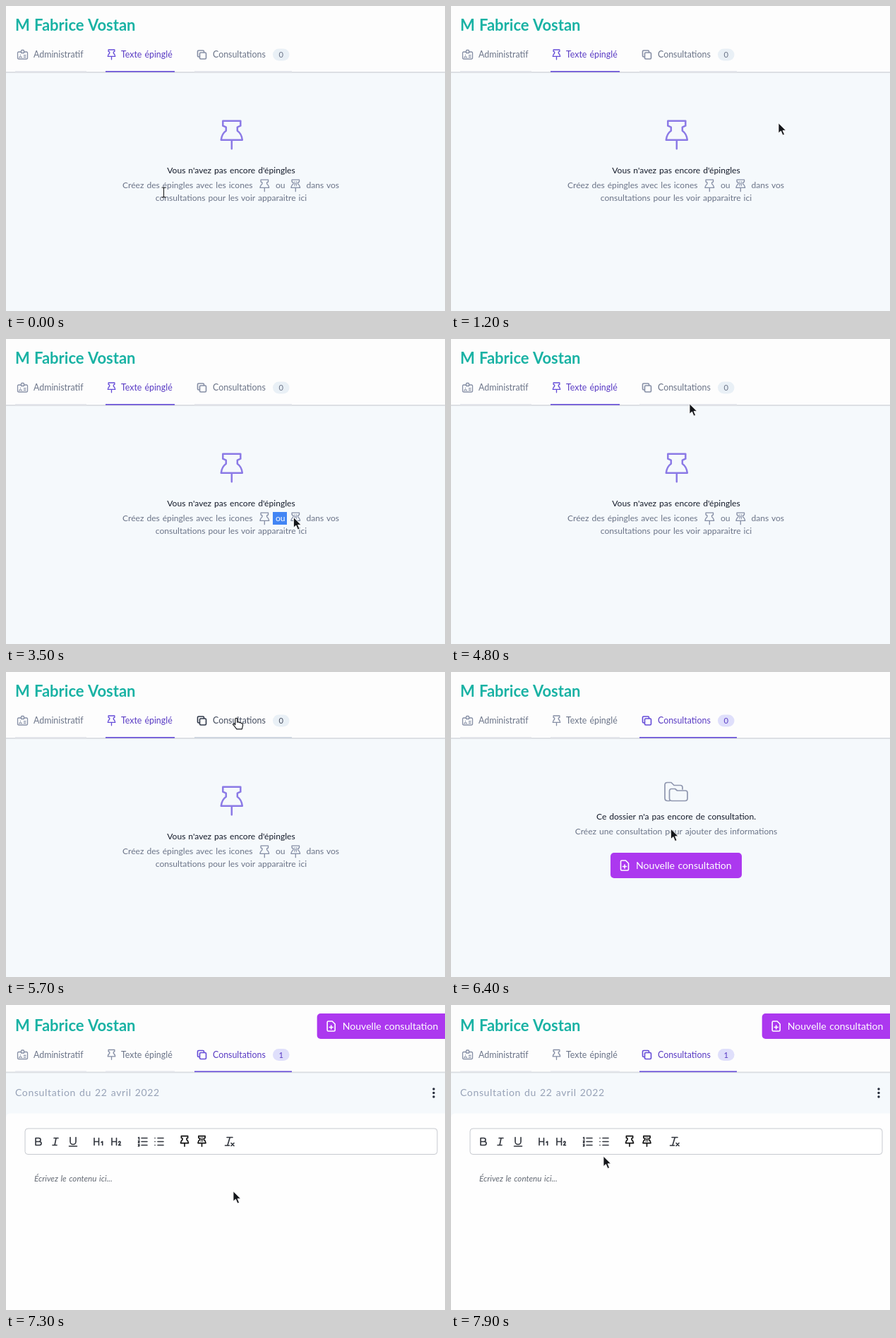
An HTML page for the animation above (8000 ms loop, 622 by 432 pixels).

```html
<!DOCTYPE html>
<html lang="fr">
<head>
<meta charset="utf-8">
<title>Consultations</title>
<style>
  html, body { margin: 0; width: 100%; height: 100%; overflow: hidden; background: #f5f9fc; }
  svg { display: block; width: 622px; height: 432px; font: 12.1px Lato, sans-serif; word-spacing: .07em; }
  path { fill: none; stroke: currentColor; stroke-width: 1.3; stroke-linejoin: round; stroke-linecap: round; vector-effect: non-scaling-stroke; }
  text { fill: currentColor; white-space: pre; }
  .mid { text-anchor: middle; }
  .dark { color: #151c2b; }
  .soft { color: #6b7488; }
  .tab { color: #6b7488; font-size: 12.4px; --line: #e4e6ec; --pill: #e9f0f6; }
  .tab .icon { color: #858ea5; }
  .tab.hover { color: #454d5f; --line: #cbd4df; }
  .tab.hover .icon { color: #2f3849; }
  .tab.active { color: #5a3cc4; --line: #644bd8; --pill: #dfdffb; }
  .tab.active .icon { color: #644bd8; }
  .line { fill: var(--line); }
  .pill { fill: var(--pill); }
  .button { color: #fff; font-size: 14.1px; }
  .tools path { stroke-width: 1.6; }
</style>
</head>
<body>
<svg id="stage" viewBox="0 0 622 432"></svg>
<script>
const PIN = 'M-12.5-20H12.5V-13L8-11V-6Q14-2 15 7H-15Q-14-2-8-6V-11L-12.5-13ZM0 7V19.5';
const HASH = 'M-3-14V1M3-14V1M-3-6H3';
const CARD = 'M-2-4H-5.500Q-7-4-7-2.500V4.500Q-7 6-5.500 6H5.500Q7 6 7 4.500V-2.500Q7-4 5.500-4H2M-2-2.500V-5.500Q-2-6.500-1-6.500H1Q2-6.500 2-5.500V-2.500ZM-4.800 3.800Q-3 2-1.200 3.800M-3 .500V.700M1.800 .800H4.500M1.800 3.300H4.500';
const COPY = 'M-1.500-3H4.500Q6-3 6-1.500V4.500Q6 6 4.500 6H-1.500Q-3 6-3 4.500V-1.500Q-3-3-1.500-3ZM-3 3H-4.500Q-6 3-6 1.500V-4.500Q-6-6-4.500-6H1.500Q3-6 3-4.500V-3';
const FOLDER = 'M-9.500 12.500H-12Q-16 12.500-16 8.500V-10Q-16-13.500-12.500-13.500H-7L-3-9.500H6Q9-9.500 9-6.500V-4M-9.500 9V-1.500Q-9.500-4.500-6.500-4.500H-1.500L1.500-2H13Q16-2 16 1V9Q16 12.500 12.500 12.500H-6Q-9.500 12.500-9.500 9Z';
const FILE = 'M-5.500-5.500Q-5.500-7-4-7H1.500L5.500-3V5.500Q5.500 7 4 7H-4Q-5.500 7-5.500 5.500ZM-2.500 1.500H2.500M0-1V4';

// Text-editor glyphs on an 18 px grid
const BULLETS = 'M7 4H15M7 9H15M7 14H15';
const TOOLS = [
  [46, 'M5 4H9.5a2.500 2.500 0 0 1 0 5H5ZM5 9H10.500a2.500 2.500 0 0 1 0 5H5Z'],
  [70, 'M7 4H13M5 14H11M8 14L10 4'],
  [95, 'M5 3V9a4 4 0 0 0 8 0V3M3.500 15.500H14.500'],
  [131, 'M3 4V14M9.500 4V14M3 9H9.500M13 10L14.700 8.800V14'],
  [156, 'M3 4V14M9.500 4V14M3 9H9.500M12.500 10Q12.800 8.700 14 8.800T15 10.200Q15 11.500 12.500 14H15.500'],
  [194, BULLETS + 'M2.500 3.500L3.500 3V6M2.500 8H4L2.500 10.500H4M2.500 13H4L3 14.200 4 15 2.500 15.500'],
  [217, BULLETS + 'M3 4H3.100M3 9H3.100M3 14H3.100'],
  [317, 'M5 3H13M6 14L9.300 3M11 11L15 15M15 11L11 15M2.500 14.500H8.500'],
];

const path = (d, x, y, scale = 1, width = '') =>
  `<path d="${d}" transform="translate(${x} ${y}) scale(${scale})" ${width && `style="stroke-width:${width}"`}/>`;
const hashPin = (x, y, scale) => path(PIN, x, y, scale) + path(HASH, x, y, scale, .9);
const text = (s, x, y, cls = '') => `<text x="${x}" y="${y}" class="${cls}">${s}</text>`;
const box = (x, y, w, h, fill, r = 0, more = '') =>
  `<rect x="${x}" y="${y}" width="${w}" height="${h}" rx="${r}" fill="${fill}" ${more}/>`;
const tab = (id, x, w, icon, label, labelX) =>
  `<g id="${id}" class="tab"><rect class="line" x="${x}" y="92" width="${w}" height="1.6"/>
   <g class="icon">${icon}</g>${text(label, labelX, 73)}`;
const button = id => `<g id="${id}" class="button">${box(226, 256, 186, 36, '#ac38ef', 5)}
  ${path(FILE, 246, 274, 1, 1.6)}${text('Nouvelle consultation', 262, 279)}</g>`;

stage.innerHTML = `
<g id="header">
  ${box(0, -5, 622, 98.500, '#fdfdfd')}${box(0, 93, 622, 1.800, '#dadde2')}
  <g font-size="22" font-weight="700" color="#19b2a4">${text('M Fabrice Vostan', 13, 35)}</g>
  ${tab('admin', 13, 101, path(CARD, 23.500, 69), 'Administratif', 39)}</g>
  ${tab('pinned', 141, 98, path(PIN, 149.500, 69, .35), 'Texte épinglé', 163)}</g>
  ${tab('consults', 267, 138, path(COPY, 277.500, 69, 1, 1.6), 'Consultations', 293)}
    <rect class="pill" x="378" y="60.500" width="23.500" height="17" rx="8.500"/>
    <text id="count" class="mid" x="389.700" y="73" font-size="11.2"></text>
  </g>
</g>
<g id="pinPane">
  <g color="#8b7ae6">${path(PIN, 319.800, 182.700, 1, 2.500)}</g>
  ${text("Vous n'avez pas encore d'épingles", 319, 237, 'mid dark')}
  <g class="soft">
    ${text('Créez des épingles avec les icones', 165, 258)}
    ${text('dans vos', 425.500, 258)}
    ${text('consultations pour les voir apparaitre ici', 319, 276, 'mid')}
    <rect id="selection" x="378" y="245" height="18" fill="#4285f4"/>
    <text id="or" x="382" y="258">ou</text>
    <g color="#858ea5">
      ${path(PIN, 366.300, 254.500, .42)}${hashPin(410.300, 254.500, .42)}
    </g>
  </g>
</g>
<g id="emptyPane">
  <g color="#8f97af">${path(FOLDER, 319, 170, 1, 1.700)}</g>
  ${text("Ce dossier n'a pas encore de consultation.", 319, 209, 'mid dark')}
  ${text('Créez une consultation pour ajouter des informations', 319, 230, 'mid soft')}
  <g id="ring">${box(224, 253.700, 190, 40.500, '#fff', 6, 'stroke="#83cbe5" stroke-width="2"')}</g>
  ${button('create')}
</g>
<g id="editPane">
  <g transform="translate(214.7 -244)">${button('createTop')}</g>
  <g font-size="14" letter-spacing=".65" color="#97a2b7">${text('Consultation du 22 avril 2022', 13, 129)}</g>
  ${[119, 124.500, 130].map(y => `<circle cx="606" cy="${y}" r="1.700" fill="#252c3a"/>`).join('')}
  ${box(0, 153.500, 640, 290, '#fefefe', 6)}
  ${box(27, 175, 584, 36.500, '#fff', 4, 'stroke="#c6c9cf"')}
  <g class="tools" color="#30343c">${TOOLS.map(([x, d]) => path(d, x - 9, 184.500)).join('')}</g>
  <g class="tools" color="#111">${path(PIN, 253, 193, .37)}${hashPin(277.500, 193, .37)}</g>
  <g font-size="11.65" font-style="italic" color="#656b75">${text('Écrivez le contenu ici...', 40, 250)}</g>
</g>
<g id="cursor">
  <path id="arrow" d="M0 0V14L3.500 11 6 17 8.500 16 6 10.300H10.300Z" style="fill:#14161a;stroke:#fff;stroke-width:.8"/>
  <path id="beam" d="M-2.500-7Q0-7 0-5.500V5.500Q0 7-2.500 7M2.500-7Q0-7 0-5.500V5.500Q0 7 2.500 7" style="stroke:#222;stroke-width:1.100"/>
  <path id="hand" d="M-1.500 9.500V1.500a1.500 1.500 0 0 1 3 0V6L3 5.500 4.500 6.300 6 6.300 7 7.300 8.500 7.500Q9.600 8.200 9.200 10.500L8 15.500H.5Q-1.500 12.500-4.800 9Q-4.500 7-1.500 9.500Z" style="fill:#fff;stroke:#1c1e22;stroke-width:1.200"/>
</g>`;

// Pointer stops: time, x, y, shape
const STOPS = [
  [0, 223.5, 264, beam], [700, 238, 252, beam], [800, 219, 258, beam], [900, 227, 263, beam],
  [1100, 380, 215, arrow], [1200, 464, 166, arrow], [1300, 335, 105, arrow], [1400, 225, 105, arrow],
  [1600, 205, 125, arrow], [1700, 255, 190, arrow], [1800, 340, 238, arrow], [1900, 363, 239, beam],
  [2100, 364.5, 238.7, arrow], [2300, 352, 246, arrow], [2400, 357, 251, arrow], [2600, 359, 252, arrow],
  [2900, 370, 253, arrow], [3000, 380, 255, beam], [3100, 388, 255, beam], [3200, 396, 255, beam],
  [3300, 402, 254, arrow], [3500, 407.5, 253, arrow], [4000, 414, 253.5, arrow],
  [4400, 430, 245, arrow], [4500, 424, 220, arrow], [4600, 402, 180, arrow], [4700, 372, 135, arrow],
  [4800, 338, 92, arrow], [4900, 318, 66, hand], [5000, 309, 47, hand],
  [5200, 314, 55, hand], [5300, 321, 61, hand], [5400, 326.3, 65.3, hand],
  [6100, 322, 90, arrow], [6200, 318, 140, arrow], [6300, 313, 195, arrow], [6400, 311.5, 222.5, arrow],
  [6500, 320, 260, hand], [6600, 327.3, 264.5, hand], [7300, 322, 264, arrow],
  [7600, 290, 240, arrow], [7700, 242, 213, arrow], [7900, 216, 214.5, arrow],
];

const show = (el, on) => el.style.display = on ? '' : 'none';

function draw() {
  const t = performance.now() % 8000;
  const [, x, y, shape] = STOPS.findLast(stop => stop[0] <= t);
  cursor.setAttribute('transform', `translate(${x} ${y})`);
  for (const el of [arrow, beam, hand]) show(el, el === shape);

  const opened = t >= 5900, editing = t >= 7300;
  show(pinPane, !opened);
  show(emptyPane, opened && !editing);
  show(editPane, editing);
  header.setAttribute('transform', `translate(0 ${editing ? 1.5 : 0})`);
  pinned.classList.toggle('active', !opened);
  consults.classList.toggle('active', opened);
  consults.classList.toggle('hover', t >= 4900 && !opened);
  count.textContent = editing ? 1 : 0;

  const selected = t < 3000 || t >= 4400 ? 0 : Math.min(20, 4 + 8 * Math.floor((t - 3000) / 100));
  selection.setAttribute('width', selected);
  or.style.fill = selected > 10 ? '#fff' : '';
  create.firstElementChild.setAttribute('fill', t >= 6500 ? '#c27af8' : '#ac38ef');
  show(ring, t >= 7200);
  requestAnimationFrame(draw);
}
draw();
</script>
</body>
</html>
```
